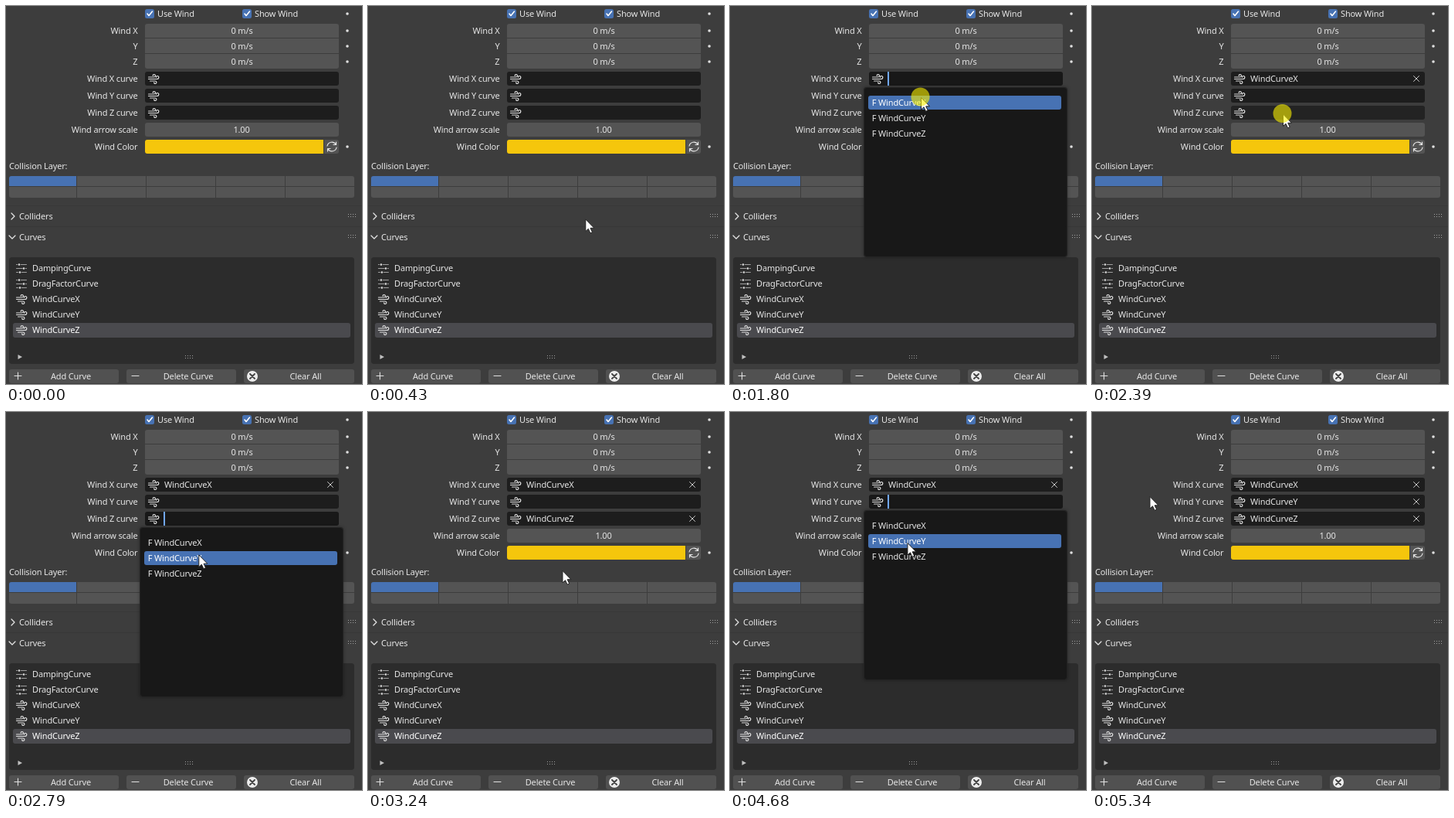
Animation of 461x489 px, one loop 5.57 s. Source, as an HTML page with a canvas:

```html
<!DOCTYPE html>
<html lang="en">
<head>
<meta charset="utf-8">
<title>Wind curves panel</title>
<style>
html, body { margin: 0; width: 100%; height: 100%; overflow: hidden; background: #3d3d3d; }
canvas { display: block; }
</style>
</head>
<body>
<canvas id="stage" width="461" height="489"></canvas>
<script>
const ctx = document.getElementById('stage').getContext('2d');
const LOOP = 5570;
const TEXT = '#e6e6e6', PANEL = '#3d3d3d', BUTTON = '#545454', FIELD = '#1d1d1d', BLUE = '#4772b3';

// Pointer keys: time, x, y
const path = [
  [180, 322, 479], [660, 245, 94], [1390, 245, 94], [1600, 247, 118], [1860, 247, 118],
  [2260, 247, 139.5], [2480, 247, 139.5], [2910, 250, 198], [2950, 251, 200], [3100, 251, 200],
  [3240, 251.5, 205], [3630, 233, 127], [3700, 230.5, 113.5], [3940, 230.5, 113.5], [4190, 229, 146],
  [4320, 229.5, 159], [4600, 229.5, 159], [4680, 229.5, 169], [4740, 225, 169],
  [5140, 141, 138], [5340, 74.5, 109]
];

// Each visit opens a field's menu and picks a curve
const visits = [
  { row: 0, press: 1140, open: 1200, pick: 1770, close: 1880 },
  { row: 2, press: 2390, open: 2440, pick: 3100, close: 3210 },
  { row: 1, press: 3840, open: 3910, pick: 4600, close: 4710 }
];
const axes = ['X', 'Y', 'Z'];
const between = (t, a, b) => t >= a && t < b;
const fieldTop = row => 85 + row * 22;

function pointerAt(t) {
  if (t < path[0][0]) return null;
  let i = 0;
  while (i < path.length - 1 && t >= path[i + 1][0]) i++;
  const a = path[i], b = path[i + 1] || a;
  const k = b === a ? 0 : (t - a[0]) / (b[0] - a[0]);
  const e = k * k * (3 - 2 * k) * 0.5 + k * 0.5;
  return { x: a[1] + (b[1] - a[1]) * e, y: a[2] + (b[2] - a[2]) * e };
}

function box(x, y, w, h, color, r = 3) {
  ctx.fillStyle = color;
  ctx.beginPath();
  ctx.roundRect(x, y, w, h, r);
  ctx.fill();
}

function label(str, x, y, align = 'left', color = TEXT) {
  ctx.font = '11px "Noto Sans", "DejaVu Sans", sans-serif';
  ctx.letterSpacing = '-0.15px';
  ctx.textAlign = align;
  ctx.textBaseline = 'alphabetic';
  ctx.fillStyle = color;
  ctx.fillText(str, x, y + 4);
}

function stroke(d, x, y, color = '#dedede', width = 1.1) {
  ctx.save();
  ctx.translate(x, y);
  ctx.strokeStyle = color;
  ctx.lineWidth = width;
  ctx.lineCap = ctx.lineJoin = 'round';
  ctx.stroke(new Path2D(d));
  ctx.restore();
}

function dot(x, y, r, color) {
  ctx.fillStyle = color;
  ctx.beginPath();
  ctx.arc(x, y, r, 0, 7);
  ctx.fill();
}

function windIcon(x, y) {
  stroke('M-6.5 -2.5H0.5C3 -2.5 3 -6 0.8 -6C-0.5 -6 -1 -5 -0.7 -4.2' +
    'M-6.5 0H4.5C7.5 0 7.5 -4 5 -4C3.7 -4 3.2 -3 3.5 -2.2' +
    'M-4.5 2.5H2C4.5 2.5 4.5 6 2.2 6C1 6 0.5 5 0.8 4.3', x, y + 0.5, '#e0e0e0', 1.2);
}

function sliderIcon(x, y) {
  stroke('M-6.5 -5H-5.5M-0.5 -5H6.5M-6.5 0H1M5.5 0H6.5M-6.5 5H-4.5M0.5 5H6.5', x, y + 0.5, '#a0a0a0', 1);
  [[-3, -5], [3, 0], [-2, 5]].forEach(p => dot(x + p[0], y + 0.5 + p[1], 1.3, '#dcdcdc'));
}

function grip(x, y) {
  ctx.fillStyle = '#a0a0a0';
  for (let i = 0; i < 8; i++) ctx.fillRect(x + (i % 4) * 3, y + (i >> 2) * 3, 1, 1);
}

function checkbox(x, str) {
  box(x, 4, 12, 12, BLUE, 2.5);
  stroke('M-3 0L-1 2.5L3.5 -3', x + 6, 10, '#fff', 1.6);
  label(str, x + 16, 10);
}

function settings(t, mouse, menu) {
  const over = (x, y, w, h) => !menu && mouse &&
    mouse.x >= x && mouse.x < x + w && mouse.y >= y && mouse.y < y + h;

  checkbox(180, 'Use Wind');
  checkbox(306, 'Show Wind');
  [10, 32, 52, 72, 182].forEach(y => dot(442, y, 1.8, '#e0e0e0'));

  ['Wind X', 'Y', 'Z'].forEach((str, i) => {
    const y = 22 + i * 20, cut = i === 0 ? 1 : 0;
    box(180, y + cut, 251, 19 - cut, BUTTON, i === 0 ? [3, 3, 0, 0] : i === 2 ? [0, 0, 3, 3] : 0);
    label(str, 170.5, y + 10, 'right');
    label('0 m/s', 305.5, y + 10, 'center');
  });

  axes.forEach((axis, row) => {
    const y = fieldTop(row), mid = y + 9;
    const visit = visits.find(v => v.row === row);
    label(`Wind ${axis} curve`, 170.5, mid, 'right');
    box(180, y, 251, 18, menu === visit ? '#181818' : over(180, y, 251, 18) ? '#232323' : FIELD);
    windIcon(191, mid);
    if (menu === visit) {
      ctx.fillStyle = '#71a8ff';
      ctx.fillRect(204, y, 2, 18);
    } else if (t >= visit.close) {
      label('WindCurve' + axis, 205, mid);
      stroke('M-3.5 -3.5L3.5 3.5M3.5 -3.5L-3.5 3.5', 420, mid, '#c8c8c8', 1);
    }
  });

  label('Wind arrow scale', 170.5, 160, 'right');
  box(180, 151, 251, 18, over(180, 151, 251, 18) ? '#656565' : BUTTON);
  label('1.00', 305, 160, 'center');

  label('Wind Color', 170.5, 182, 'right');
  box(180, 173, 231, 18, '#f5c60c', [3, 0, 0, 3]);
  box(412, 173, 19, 18, BUTTON, [0, 3, 3, 0]);
  stroke('M-6 -1A6 6 0 0 1 5 -3M5.5 -6V-2.5H2M6 1A6 6 0 0 1 -5 3M-5.5 6V2.5H-2', 422, 182, '#e6e6e6', 1.2);

  label('Collision Layer:', 4, 207);
  for (let i = 0; i < 10; i++) {
    const col = i % 5, row = i / 5 | 0;
    const x = col ? 2 + col * 90 : 4;
    const r = [i === 0, i === 4, i === 9, i === 5].map(c => c ? 3 : 0);
    box(x, 220 + row * 14, col ? 89 : 87, row ? 14 : 13, i ? BUTTON : BLUE, r);
  }
}

function curvesPanel(mouse) {
  ctx.fillStyle = '#383838';
  ctx.fillRect(0, 258, 461, 1);
  ctx.fillRect(0, 285, 461, 1);
  stroke('M-2 -4L2 0L-2 4', 9, 272, TEXT, 1.2);
  label('Colliders', 17, 272);
  grip(443, 269);
  stroke('M-4 -2L0 2L4 -2', 8, 299, TEXT, 1.2);
  label('Curves', 17, 299);
  grip(443, 296);

  box(4, 325, 447, 138, '#2c2c2c', 4);
  box(9, 410, 437, 19, '#4a4a4e');
  ['DampingCurve', 'DragFactorCurve', 'WindCurveX', 'WindCurveY', 'WindCurveZ'].forEach((str, i) => {
    const y = 339 + i * 20;
    (i < 2 ? sliderIcon : windIcon)(20, y);
    label(str, 34, y, 'left', i === 4 ? '#fff' : TEXT);
  });
  ctx.fillStyle = '#c0c0c0';
  ctx.fill(new Path2D('M15.5 451L21 454L15.5 457Z'));
  grip(232, 452);

  [[4, 142, 'Add Curve', 84], [156, 142, 'Delete Curve', 236], [308, 143, 'Clear All', 388]].forEach(([x, w, str, mid]) => {
    const hot = mouse && mouse.y >= 470 && mouse.x >= x && mouse.x < x + w;
    box(x, 470, w, 18, hot ? '#656565' : '#515151');
    label(str, mid, 479, 'center');
  });
  stroke('M-4.5 0H4.5M0 -4.5V4.5', 15.5, 478.5, '#e0e0e0');
  stroke('M-4.5 0H4.5', 167.5, 478.5, '#e0e0e0');
  dot(319, 479, 7, '#ededed');
  stroke('M-3 -3L3 3M3 -3L-3 3', 319, 479, '#444', 1.9);
}

function popup(menu, mouse) {
  const top = fieldTop(menu.row) + 20;
  ctx.save();
  ctx.shadowColor = 'rgba(0,0,0,.35)';
  ctx.shadowBlur = 4;
  box(173, top, 264, 220, '#242424', 4);
  ctx.restore();
  box(174, top + 1, 262, 218, '#181818', 4);
  axes.forEach((axis, i) => {
    const y = top + 11 + i * 20;
    const hot = mouse.y >= y && mouse.y < y + 20;
    if (hot) box(179, y, 250, 18, BLUE);
    label('F WindCurve' + axis, 183.7, y + 9, 'left', hot ? '#fff' : TEXT);
  });
}

function arrow(x, y) {
  ctx.save();
  ctx.translate(x, y);
  const shape = new Path2D('M0.5 0.5V16L4 12.8L6.6 18.3L9.2 17.1L6.7 11.8H11.5Z');
  ctx.lineWidth = 1;
  ctx.strokeStyle = '#222';
  ctx.fillStyle = '#fff';
  ctx.fill(shape);
  ctx.stroke(shape);
  ctx.restore();
}

function beam(x, y) {
  const d = 'M-3 -7H-1L0 -6L1 -7H3M0 -6V6M-3 7H-1L0 6L1 7H3';
  stroke(d, x, y, '#222', 2.4);
  stroke(d, x, y, '#f0f0f0', 1);
}

function pointer(t, mouse) {
  if (between(t, 890, 1390)) beam(mouse.x + 2.5, mouse.y + 1);
  else arrow(mouse.x, mouse.y);
  // The click marker tints the pointer below it
  const pressed = visits.some(v => between(t, v.press, v.open) || between(t, v.pick, v.pick + 65));
  if (pressed) dot(mouse.x - 0.5, mouse.y - 0.5, 12, 'rgba(250,240,0,.6)');
}

function draw(t) {
  const mouse = pointerAt(t);
  const menu = visits.find(v => between(t, v.open, v.close));
  ctx.fillStyle = PANEL;
  ctx.fillRect(0, 0, 461, 489);
  settings(t, mouse, menu);
  curvesPanel(mouse);
  if (menu) popup(menu, mouse);
  if (mouse) pointer(t, mouse);
}

const start = performance.now();
function frame() {
  draw((performance.now() - start) % LOOP);
  requestAnimationFrame(frame);
}
frame();
</script>
</body>
</html>
```
